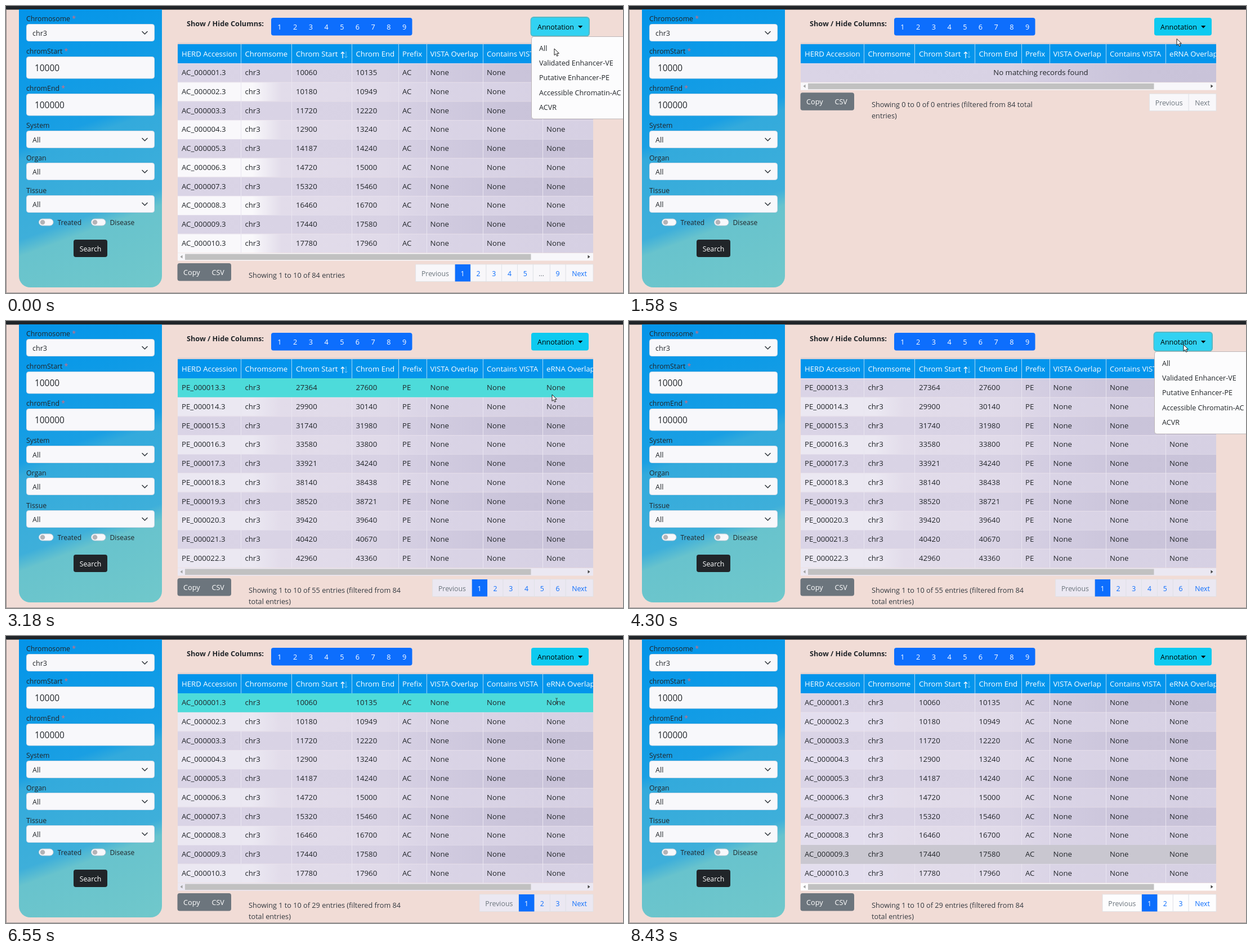
These frames come from a looping animation (1096 px wide and 511 px high, 9050 ms). An HTML page:

```html
<!DOCTYPE html>
<html lang="en">
<head>
<meta charset="utf-8">
<title>Enhancer table filter</title>
<style>
html, body { margin: 0; width: 100%; height: 100%; overflow: hidden; background: #f1dcd6; }
svg { display: block; width: 100%; height: 100%; --tint: #f9f8fb; --page: #f9f8fb; }
text { font-family: "Open Sans", "Noto Sans", sans-serif; white-space: pre; }
.tint { stop-color: var(--tint); }
.page { fill: var(--page); }
</style>
</head>
<body>
<svg id="stage" viewBox="0 0 1096 511" xmlns="http://www.w3.org/2000/svg"></svg>
<script>
const LOOP = 9050, TOP = 102, ROW = 33.75, ITEM = 26.4;
const INK = '#212529', BLUE = '#0d6efd', GREY = '#6c757d';
const stage = document.getElementById('stage');

const text = (x, y, s, size = 13.2, fill = INK, extra = '') =>
  `<text x="${x}" y="${y}" font-size="${size}" fill="${fill}" ${extra}>${s}</text>`;
const mid = (x, y, s, size, fill) => text(x, y, s, size, fill, 'text-anchor="middle"');
const rect = (x, y, w, h, fill, extra = '') =>
  `<rect x="${x}" y="${y}" width="${w}" height="${h}" fill="${fill}" ${extra}/>`;
const path = (d, stroke, w = 1, extra = '') =>
  `<path d="${d}" fill="none" stroke="${stroke}" stroke-width="${w}" ${extra}/>`;
const each = (list, fn) => list.map(fn).join('');

// ---- search form ----
const label = (y, s, star) => text(36, y, s + (star ? ' <tspan fill="#e0697a">*</tspan>' : ''), 12.3);
const box = (y, h) => rect(36.5, y + .5, 227, h - 1, '#f8f8fb', 'rx="4" stroke="#d3dce8"');
const select = (y, s) => box(y, 31) + text(47, y + 20.5, s, 12.6) +
  path(`M242 ${y + 13.5}l4.5 4.5l4.5 -4.5`, '#343a40', 1.6, 'stroke-linecap="round" stroke-linejoin="round"');
const input = (y, s) => box(y, 39.5) + text(51, y + 26, s, 15.4);
const toggle = (x, s) => rect(x + .5, 379, 25.5, 12, '#f8f8fb', 'rx="6" stroke="#c3cdd6"') +
  `<circle cx="${x + 7}" cy="385" r="4.3" fill="#b3b3b7"/>` + text(x + 33.5, 389.5, s, 12.1);

const form =
  '<path d="M23 6H277V481a20 20 0 0 1 -20 20H43a20 20 0 0 1 -20 -20Z" fill="url(#panel)"/>' +
  label(27, 'Chromosome', 1) + select(32, 'chr3') +
  label(85, 'chromStart', 1) + input(90, '10000') +
  label(151, 'chromEnd', 1) + input(156, '100000') +
  label(217, 'System') + select(222, 'All') +
  label(274.5, 'Organ') + select(279, 'All') +
  label(332.5, 'Tissue') + select(337, 'All') +
  toggle(58, 'Treated') + toggle(151, 'Disease') +
  rect(120, 416, 60, 31, INK, 'rx="4"') + mid(150, 437, 'Search', 12.3, '#fff');

// ---- table ----
const colX = [312, 424.5, 515, 621.5, 704, 753.5, 854, 960];
const edges = [417.5, 507.5, 614.5, 697.5, 747.5, 847.5, 953.5];
const heads = ['HERD Accession', 'Chromsome', 'Chrom Start', 'Chrom End', 'Prefix',
  'VISTA Overlap', 'Contains VISTA', 'eRNA Overlap'];
const rowY = i => TOP + ROW * i;
const rules = (y, h, c) => path(each(edges, x => `M${x} ${y}v${h}`), c);

const header = rect(305, 65.5, 738, 2.5, '#d9cfd2') + rect(305, 68, 738, 34, '#0395ec') +
  rules(68, 34, '#a9d8f7') +
  `<g clip-path="url(#table)">${each(heads, (s, i) => text(colX[i], 90.3, s, 13.2, '#fff'))}</g>` +
  path('M598 93V82M595 85l3 -3l3 3', '#fff', 1.3) +
  path('M604 81V92M601.5 89.5l2.5 2.5l2.5 -2.5', '#fff', 1, 'opacity=".45"');

const stripes = n => each([...Array(n).keys()], i =>
  rect(305, rowY(i), 738, ROW, `url(#${i % 2 ? 'even' : 'odd'})`)) +
  path(each([...Array(n).keys()], i => `M305 ${rowY(i) + .5}h738`), '#e9e5f0', 1, 'opacity=".6"');

const rows = (prefix, first, spans) => each(spans, ([from, to], i) => {
  const id = `${prefix}_${String(first + i).padStart(6, '0')}.3`;
  return each([id, 'chr3', from, to, prefix, 'None', 'None', 'None'],
    (s, c) => text(colX[c], rowY(i) + 21.2, s));
});

const acRows = rows('AC', 1, [[10060, 10135], [10180, 10949], [11720, 12220], [12900, 13240],
  [14187, 14240], [14720, 15000], [15320, 15460], [16460, 16700], [17440, 17580], [17780, 17960]]);
const peRows = rows('PE', 13, [[27364, 27600], [29900, 30140], [31740, 31980], [33580, 33800],
  [33921, 34240], [38140, 38438], [38520, 38721], [39420, 39640], [40420, 40670], [42960, 43360]]);

// ---- footer: scrollbar, export buttons, info, pager ----
const scrollbar = rect(305, 440, 738, 13.5, '', 'class="page"') + rect(318, 441.5, 614.5, 10.5, '#c1c1c1') +
  '<path d="M313.5 443.5v6l-4 -3Z" fill="#a0a0a0"/><path d="M1033.5 443.5v6l4 -3Z" fill="#444"/>';
const exporter = rect(304.5, 458, 95.5, 31.5, GREY, 'rx="4"') +
  text(315, 479, 'Copy', 12.7, '#fff') + text(365.5, 479, 'CSV', 12.5, '#fff');

function pager(pages) {
  const items = ['Previous', ...pages, 'Next'];
  let x = 1043, out = '';
  for (const s of items.reverse()) {
    const w = s === 'Next' ? 49 : s === 'Previous' ? 69.5 : s === '…' ? 30 : 27.8;
    x -= w;
    const on = s === 1, off = s === 'Previous' || s === '…' || !pages.length;
    out += rect(x, 460, w, 30.5, on ? BLUE : '', on ? '' : 'class="page" stroke="#dee2e6" stroke-width=".8"') +
      mid(x + w / 2, 480.5, s === '…' ? '...' : s, 12.3, on ? '#fff' : off ? GREY : BLUE);
  }
  return out;
}
const footer = (lines, pages) => scrollbar + exporter +
  each(lines, (s, i) => text(431, 484 + 20 * i, s, 12.7, '#343a40')) + pager(pages);

const views = {
  all: { n: 10, body: acRows, foot: footer(['Showing 1 to 10 of 84 entries'], [1, 2, 3, 4, 5, '…', 9]) },
  none: { n: 1, body: mid(731.5, 123.2, 'No matching records found', 13.2),
    foot: footer(['Showing 0 to 0 of 0 entries (filtered from 84 total', 'entries)'], []) },
  pe: { n: 10, body: peRows,
    foot: footer(['Showing 1 to 10 of 55 entries (filtered from 84', 'total entries)'], [1, 2, 3, 4, 5, 6]) },
  ac: { n: 10, body: acRows,
    foot: footer(['Showing 1 to 10 of 29 entries (filtered from 84', 'total entries)'], [1, 2, 3]) }
};
const viewGroup = (name, { n, body, foot }) => `<g id="${name}">${stripes(n)}` +
  (n > 1 ? rules(TOP, ROW * n, '#e9e5f0') : '') +
  rect(305, 0, 738, ROW, '#4ddbda', 'class="hover"') + body +
  `<g transform="translate(0 ${(n - 10) * ROW})">${foot}</g></g>`;

// ---- toolbar and menu ----
const toolbar = text(321, 36, 'Show / Hide Columns:', 12.7, INK, 'font-weight="700"') +
  rect(471, 21, 250.5, 31.5, BLUE, 'rx="4"') +
  each([1, 2, 3, 4, 5, 6, 7, 8, 9], n => mid(458.3 + 27.7 * n, 42, n, 12.7, '#fff')) +
  rect(931.5, 19, 105.5, 35.5, '#57b7c3', 'rx="6" id="ring"') +
  rect(933, 21, 102, 31.5, '#0dcaf0', 'rx="4" id="button"') +
  text(944, 42, 'Annotation', 12.5, '#000') + '<path d="M1016 35h8.4l-4.2 4.4Z"/>';
const menu = '<g id="menu">' + rect(933.5, 54.5, 180, 146.5, '#fcfcfd', 'rx="4" stroke="#bdb6b8"') +
  rect(934, 0, 170, ITEM, '#e9ecef', 'id="pick"') +
  each(['All', 'Validated Enhancer-VE', 'Putative Enhancer-PE', 'Accessible Chromatin-AC', 'ACVR'],
    (s, i) => text(947, 79.5 + ITEM * i, s, 12.6)) + '</g>';

const gradient = (id, stops, pos) => `<linearGradient id="${id}" gradientUnits="userSpaceOnUse" ${pos}>` +
  each(stops, ([o, c]) => `<stop offset="${o}" ${c ? `stop-color="${c}"` : 'class="tint"'}/>`) + '</linearGradient>';
const across = 'x1="305" x2="1043" y1="0" y2="0"';

stage.innerHTML = '<defs>' +
  gradient('panel', [[0, '#0494e9'], [.2, '#0c9ae7'], [.42, '#1a9fe3'], [.46, '#33aadc'],
    [.7, '#3eafda'], [.75, '#68c3cd'], [1, '#70c8cb']], 'x1="55.6" y1="-5.9" x2="244.4" y2="512.9"') +
  gradient('odd', [[0, '#dad4e6'], [.5, '#d8d2e4'], [.62, '#d1cbe0'], [.8, '#cac4da'], [1, '#c9c3d9']], across) +
  gradient('even', [[0], [.18], [.25, '#e2dcea'], [.5, '#e0dae9'], [.6, '#dad4e6'], [1, '#d6d0e3']], across) +
  '<clipPath id="table"><rect x="305" y="68" width="738" height="34"/></clipPath></defs>' +
  rect(0, 0, 1096, 511, '#f1dcd6') + rect(0, 0, 1096, 6.5, INK) +
  rect(0, 6, 1, 505, '#8f8888') + rect(0, 510, 1096, 1, '#a59d9c') +
  form + each(Object.entries(views), ([k, v]) => viewGroup(k, v)) + header + toolbar + menu +
  '<path id="arrow" d="M0 0V11.6L2.7 9.1L4.6 13.3L6.6 12.4L4.8 8.3H8.4Z" fill="#fff" stroke="#000" stroke-width=".9"/>' +
  path('M-2 -5H-.6L0 -4.4L.6 -5H2M0 -4.4V4.4M-2 5H-.6L0 4.4L.6 5H2', '#333', 1, 'id="beam"');

// ---- timeline ----
// Bursts of stepped movement: start, end, steps.
const bursts = [[140, 790, 5], [1120, 2060, 7], [2220, 3180, 7], [3500, 4300, 6],
  [4590, 5530, 7], [5710, 5860, 2], [6350, 7330, 7], [7650, 8430, 6]];
// Pointer way: time, x, y.
const way = [[0, 974, 76], [140, 973, 84], [465, 970, 102], [963, 970, 102], [1590, 974, 44],
  [1747, 974, 44], [2060, 970, 88], [2380, 968, 112], [2700, 970, 131], [3340, 970, 131],
  [3980, 985, 42], [4433, 985, 42], [5373, 981, 146], [5530, 980, 149], [6187, 980, 149],
  [6513, 978, 116], [6840, 1036, 60], [7330, 990, 352], [7494, 990, 352], [8430, 960, 520]];
// Time, view, menu open.
const scenes = [[0, 'all', 1], [627, 'none', 0], [1745, 'none', 1], [2859, 'pe', 0],
  [4139, 'pe', 1], [5709, 'ac', 0]];

function snap(t) {
  let last = 0;
  for (const [a, b, n] of bursts) {
    if (t < a) break;
    const d = (b - a) / (n - 1);
    last = Math.min(b, a + d * Math.floor((t - a) / d + .05));
  }
  return last;
}
function pointer(t) {
  const i = way.findIndex(p => p[0] > t);
  if (i < 0) return way[way.length - 1].slice(1);
  const [a, x, y] = way[i - 1], [b, u, v] = way[i], k = (t - a) / (b - a);
  return [x + (u - x) * k, y + (v - y) * k];
}

const $ = id => document.getElementById(id);
const show = (el, on) => { el.style.display = on ? '' : 'none'; };

function draw(time) {
  const t = snap(time), [x, y] = pointer(t);
  const [, view, open] = scenes.filter(s => s[0] <= t).pop();
  const late = t >= 7650, left = t > 7800;

  for (const name in views) show($(name), name === view);
  for (const id of ['menu', 'ring']) show($(id), open);
  $('button').setAttribute('fill', open ? '#31d2f2' : '#0dcaf0');
  stage.style.setProperty('--tint', late ? '#e3deee' : view === 'all' ? '#f9f8fb' : '#ebe8f2');
  stage.style.setProperty('--page', late ? '#fdfdfe' : view === 'all' || view === 'none' ? '#f8f7fa' : '#ebe8f2');

  const item = Math.floor((y - 62) / ITEM);
  show($('pick'), t > 0 && item >= 0 && item < 5);
  $('pick').setAttribute('y', 62 + ITEM * item);

  // Once the pointer leaves downwards, a faded highlight stays on the ninth row.
  const over = Math.floor((y - TOP) / ROW), row = left && over > 9 ? 8 : over;
  const hover = $(view).querySelector('.hover');
  show(hover, !open && row >= 0 && row < views[view].n);
  hover.setAttribute('y', rowY(row));
  hover.setAttribute('fill', left && over > 9 ? '#c9c7d0' : '#4ddbda');

  const beam = t > 5350 && t < 6660;
  show($('beam'), beam);
  show($('arrow'), !beam);
  $(beam ? 'beam' : 'arrow').setAttribute('transform', `translate(${x} ${y})`);
}

let start;
function frame(now) {
  start ??= now;
  draw((now - start) % LOOP);
  requestAnimationFrame(frame);
}
draw(0);
requestAnimationFrame(frame);
</script>
</body>
</html>
```
